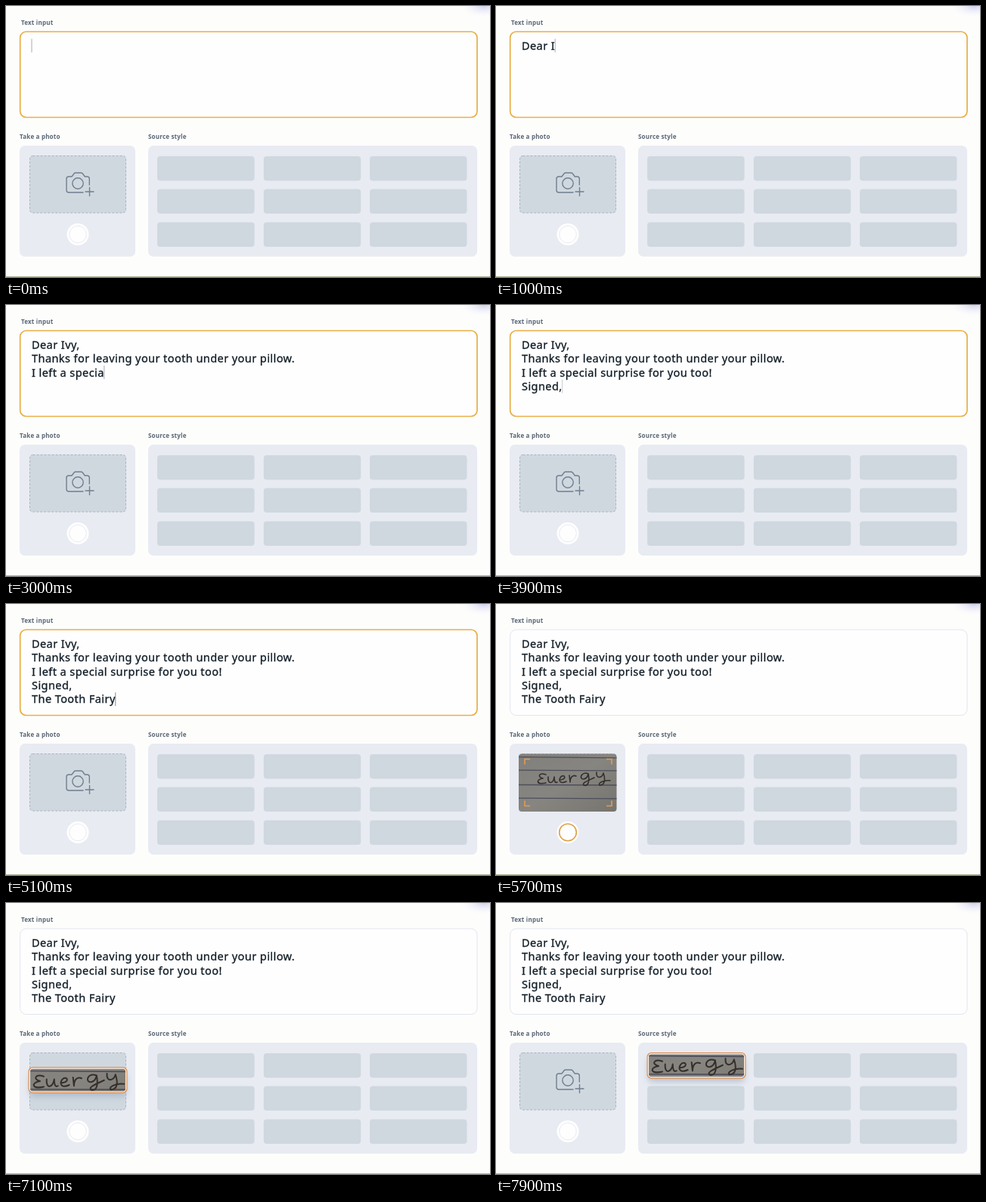
Recreate the animation shown at these times as an HTML page. Size 640 px wide and 359 px high, loop 8 s.

```html
<!DOCTYPE html>
<html lang="en">
<head>
<meta charset="utf-8">
<title>Text input and source style</title>
<style>
html, body { margin: 0; width: 100%; height: 100%; overflow: hidden; background: #fdfdfc; }
svg { display: block; width: 100vw; height: 100vh; }
text { font-family: "Noto Sans", sans-serif; white-space: pre; }
.label { font-size: 8px; font-weight: 600; letter-spacing: .2px; fill: #596675; }
.letter { font-size: 14.5px; font-weight: 500; letter-spacing: .43px; fill: #101c26; stroke: #101c26; stroke-width: .3px; }
.line { fill: none; stroke-linecap: round; stroke-linejoin: round; }
</style>
</head>
<body>
<svg viewBox="0 0 640 359" preserveAspectRatio="none">
  <defs>
    <radialGradient id="glow">
      <stop offset="0" stop-color="#cfd2ee"/>
      <stop offset="1" stop-color="#fdfdfc" stop-opacity="0"/>
    </radialGradient>
    <linearGradient id="paper" x2="1" y2="1">
      <stop offset="0" stop-color="#817f7b"/>
      <stop offset=".5" stop-color="#878580"/>
      <stop offset="1" stop-color="#74726c"/>
    </linearGradient>
    <filter id="blur" x="-20%" y="-60%" width="140%" height="220%"><feGaussianBlur stdDeviation="4"/></filter>
    <clipPath id="clip"><rect id="window" rx="4"/></clipPath>
  </defs>
  <rect width="640" height="359" fill="#fdfdfc"/>
  <ellipse cx="632" cy="0" rx="34" ry="16" fill="url(#glow)"/>
  <rect y="358" width="640" height="1" fill="#b4b49c"/>

  <text class="label" x="20" y="24.5">Text input</text>
  <text class="label" x="18" y="175.5">Take a photo</text>
  <text class="label" x="188" y="175.5">Source style</text>

  <rect id="box" x="18.7" y="34" width="604.3" height="113.5" rx="8" fill="#fefefe"/>
  <g id="letter"></g>
  <rect id="caret" width="1" height="18" fill="#6f7888"/>

  <g fill="#e8ebf2">
    <rect x="18" y="185" width="153" height="147" rx="7"/>
    <rect x="188" y="185" width="435" height="147" rx="7"/>
  </g>
  <g id="tiles" fill="#d0d8df"></g>
  <rect x="31.5" y="198.5" width="127" height="75.5" rx="4" fill="#d0d8df" stroke="#a9b4c0" stroke-dasharray="3 2"/>
  <g id="camera" class="line" stroke="#6f7f90" stroke-width="1.4">
    <path d="M102 247H83q-3 0-3-3V229q0-3 3-3h4l3-4q.7-1 2-1h7q1.5 0 2.3 1l3 4h3q3 0 3 3v8M105 246h11M110.5 240.5v11"/>
    <circle cx="95" cy="235" r="7.2"/>
  </g>
  <circle cx="95" cy="302.5" r="14.5" fill="#fefefe"/>
  <circle id="shutter" cx="95" cy="302.5" r="11.3" fill="#fefefe"/>

  <g id="photo">
    <rect id="shade" rx="5" fill="#8c9fb2" filter="url(#blur)"/>
    <g clip-path="url(#clip)">
      <g id="content">
        <rect x="25" y="190" width="140" height="92" fill="url(#paper)"/>
        <path d="M25 202.5L165 204M25 220L165 221M25 239.5L165 240M25 257L165 258" stroke="#4d4e5c" stroke-width="1.3"/>
        <path class="line" stroke="#342f2b" stroke-width="1.6" d="M66 226C57 223 54 229 62 231C53 232 52 240 66 237
          M69 229C68 240 76 238 77 229C77 234 78 238 81 236
          M84 233C94 232 91 226 87 228C82 231 83 240 93 235
          M97 227L98 236C98 229 102 226 106 228
          M122 225C113 221 109 232 116 232Q121 231 122 225C124 235 122 242 116 240C113 237 122 234 130 230
          M133 223C132 232 140 231 142 224C145 233 144 240 137 240C134 237 143 233 151 234"/>
      </g>
    </g>
    <path id="brackets" fill="none" stroke="#e09c55" stroke-width="1.6"/>
    <g id="frame" fill="none">
      <rect id="outer" rx="5" stroke="#e08a48" stroke-width="1.3"/>
      <rect id="inner" rx="4" stroke="#fff6ea" stroke-width="1.2"/>
    </g>
  </g>
</svg>
<script>
const LOOP = 8000;
const LINES = [
  "Dear Ivy,",
  "Thanks for leaving your tooth under your pillow.",
  "I left a special surprise for you too!",
  "Signed,",
  "The Tooth Fairy"
];
const TOTAL = LINES.join("\n").length;
const FULL = [30, 198.5, 129.5, 76.5], CROP = [31, 218.8, 128, 31.7], TILE = [201, 199.5, 128, 31.7];

const $ = id => document.getElementById(id);
const set = (el, attrs) => { for (const k in attrs) el.setAttribute(k, attrs[k]); };
const add = (parent, tag, attrs) => {
  const el = document.createElementNS("http://www.w3.org/2000/svg", tag);
  set(el, attrs);
  return parent.appendChild(el);
};
const ramp = (t, a, b) => Math.min(1, Math.max(0, (t - a) / (b - a)));
const ease = (t, a, b) => { const u = ramp(t, a, b); return u * u * (3 - 2 * u); };
const mix = (a, b, u) => a + (b - a) * u;
const mixRect = (a, b, u) => a.map((v, i) => mix(v, b[i], u));
const setRect = (id, [x, y, width, height], grow = 0) => set($(id), {
  x: x - grow, y: y - grow, width: width + 2 * grow, height: height + 2 * grow
});

for (const y of [199, 242.5, 286.5])
  for (const x of [200, 340.7, 481]) add($("tiles"), "rect", { x, y, width: 128.5, height: 32.5, rx: 4 });

const rows = LINES.map((_, i) => add($("letter"), "text", { class: "letter", x: 34, y: 57.7 + i * 18.4 }));

// Typing speeds up and slows down over the whole letter.
function drawLetter(t) {
  const typed = LINES.join("\n").slice(0, Math.round(TOTAL * ease(t, 370, 4925))).split("\n");
  rows.forEach((row, i) => {
    const shown = typed[i] || "";
    if (row.textContent !== shown) row.textContent = shown;
  });
  const last = typed.length - 1;
  const width = typed[last] ? rows[last].getComputedTextLength() : 0;
  const focused = t < 5300;
  set($("caret"), {
    x: 33.5 + width, y: 43.5 + last * 18.4,
    opacity: focused ? 0.6 + 0.4 * Math.sin(t * Math.PI / 500) : 0
  });
  set($("box"), { stroke: focused ? "#e9ae45" : "#e3e5f0", "stroke-width": focused ? 1.7 : 1 });
}

function drawPhoto(t) {
  const crop = ease(t, 6200, 6800), move = ease(t, 7200, 7750);
  const rect = mixRect(mixRect(FULL, CROP, crop), TILE, move);
  const scale = mix(1, 1.247, crop);
  const cx = mix(102.5, 95.5, crop) + 170 * move, cy = mix(231, 236, crop) - 20 * move;
  const framed = ramp(crop, 0.6, 1);

  set($("photo"), { opacity: ramp(t, 5400, 5600) });
  set($("content"), { transform: `translate(${cx} ${cy}) scale(${scale}) translate(-102.5 -231)` });
  setRect("window", rect);
  setRect("outer", rect, 0.8);
  setRect("inner", rect, -0.4);
  setRect("shade", [rect[0], rect[1] + 6, rect[2], rect[3]]);
  set($("frame"), { opacity: framed });
  set($("shade"), { opacity: 0.5 * framed });

  const [x, y, w, h] = mixRect([38, 205.5, 115, 62], CROP, crop);
  const corner = (px, py, sx, sy) => `M${px + 7 * sx} ${py}h${-7 * sx}v${7 * sy}`;
  set($("brackets"), {
    d: corner(x, y, 1, 1) + corner(x + w, y, -1, 1) + corner(x, y + h, 1, -1) + corner(x + w, y + h, -1, -1),
    opacity: 1 - framed
  });

  const pressed = t >= 5500 && t < 6200;
  set($("shutter"), { stroke: pressed ? "#e0a048" : "#e9ebf0", "stroke-width": pressed ? 1.6 : 1 });
  set($("camera"), { opacity: t < 5600 ? 1 : ramp(t, 7400, 7700) });
}

function draw(now) {
  const t = now % LOOP;
  drawLetter(t);
  drawPhoto(t);
  requestAnimationFrame(draw);
}
draw(0);
</script>
</body>
</html>
```
